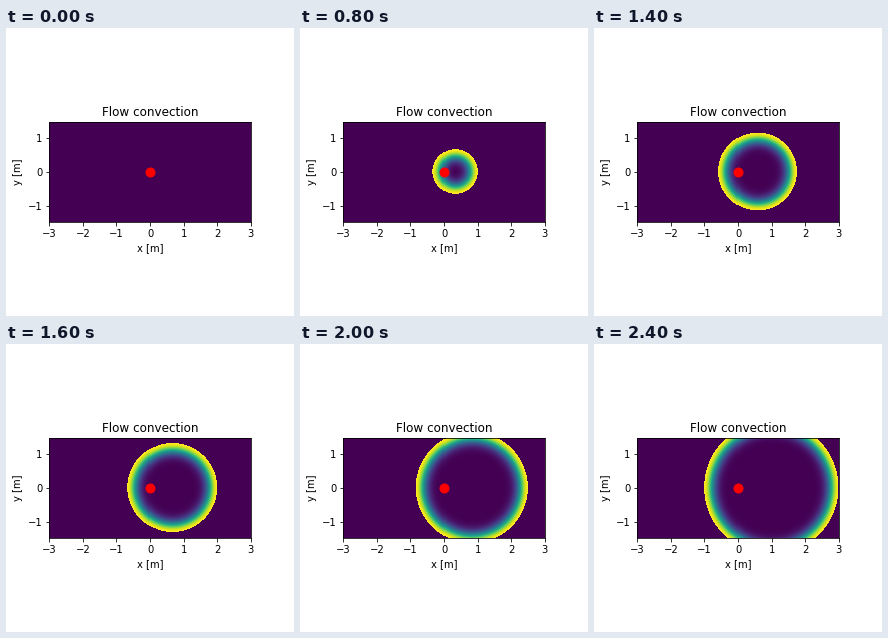
Recreate the animation shown at these times as a matplotlib script. Size 288 px wide and 288 px high, loop 2500 ms.

```python
import numpy as np
import matplotlib.pyplot as plt
from matplotlib.animation import FuncAnimation

FRAMES = 25
INTERVAL = 100          # ms
SOUND_SPEED = 2.0       # front radius after one pass
FLOW_SPEED = 1.0        # centre drift after one pass
WIDTH = 0.21            # thickness of the pulse behind the front

x = np.linspace(-3, 3, 201)
y = np.linspace(-1.5, 1.5, 101)
X, Y = np.meshgrid(x, y)


def pressure(t):
    """Pulse trailing a circular front that is carried by the flow."""
    depth = SOUND_SPEED * t - np.hypot(X - FLOW_SPEED * t, Y)
    return np.where(depth > 0, np.exp(-0.5 * (depth / WIDTH) ** 2), 0.0)


fig = plt.figure(figsize=(4, 4), dpi=72)
ax = fig.add_axes([0.15, 0.15, 0.7, 0.7])
image = ax.imshow(pressure(0), extent=(-3, 3, -1.5, 1.5), origin="lower",
                  cmap="viridis", vmin=0, vmax=1, interpolation="nearest")
ax.plot(0, 0, "ro", markersize=9)
ax.set(xlim=(-3, 3), ylim=(-1.5, 1.5), title="Flow convection",
       xlabel="x [m]", ylabel="y [m]")
ax.set_xticks(range(-3, 4))
ax.set_yticks([-1, 0, 1])


def update(i):
    image.set_data(pressure(i / (FRAMES - 1)))
    return [image]


anim = FuncAnimation(fig, update, frames=FRAMES, interval=INTERVAL,
                     repeat=True, repeat_delay=0)
plt.show()
```
